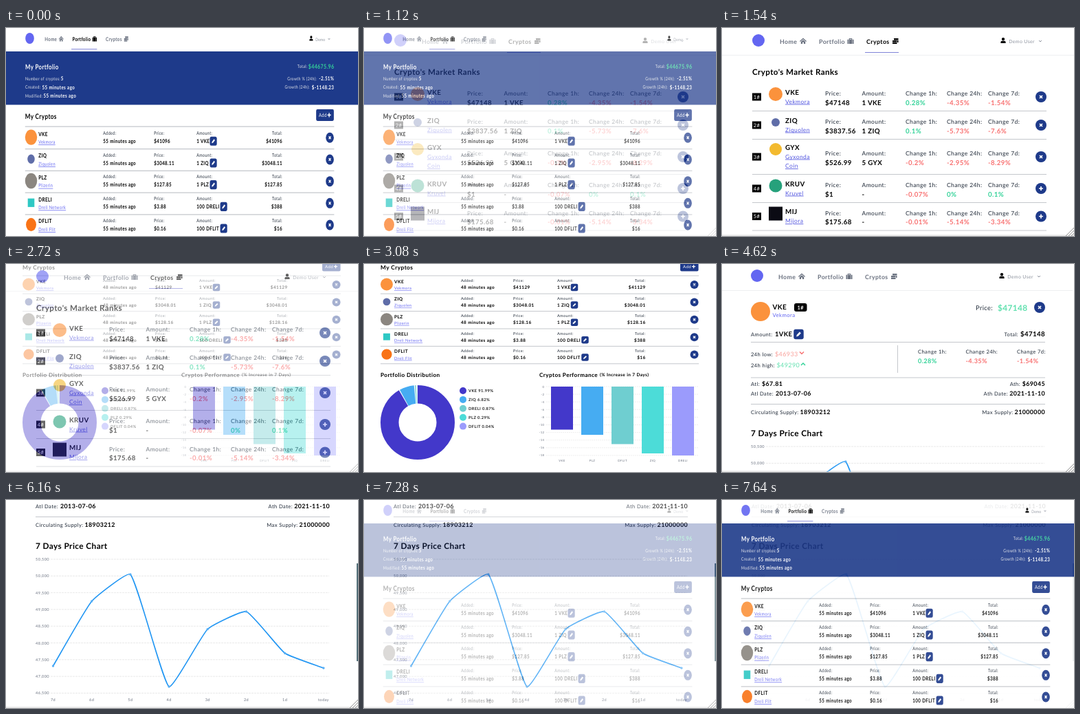
These frames come from a looping animation (512x302 px, 7700 ms). An HTML page:

```html
<!DOCTYPE html>
<html lang="en">
<head>
<meta charset="utf-8">
<title>Portfolio tour</title>
<style>
  html, body { margin: 0; width: 100%; height: 100%; overflow: hidden; background: #fff; }
  svg {
    position: fixed; inset: 0; width: 100%; height: 100%; background: #fff;
    font-family: Lato, "Open Sans", sans-serif; letter-spacing: .025em;
    text-rendering: geometricPrecision;
  }
  /* Each slide fades in over the previous one in ten hard steps; the last fades out to the first. */
  #ranks, #charts, #coin, #history { opacity: 0; animation: 7700ms steps(10, start) infinite; }
  #ranks { animation-name: ranks; }
  #charts { animation-name: charts; }
  #coin { animation-name: coin; }
  #history { animation-name: history; }
  @keyframes ranks {
    0%, 12.98% { opacity: 0 } 20.77%, 45% { opacity: 1 } 45.01%, 100% { opacity: 0 }
  }
  @keyframes charts {
    0%, 32.98% { opacity: 0 } 40.77%, 65% { opacity: 1 } 65.01%, 100% { opacity: 0 }
  }
  @keyframes coin {
    0%, 52.98% { opacity: 0 } 60.77%, 85% { opacity: 1 } 85.01%, 100% { opacity: 0 }
  }
  @keyframes history {
    0%, 72.98% { opacity: 0 } 80.77% { opacity: 1 }
    92.98% { opacity: 1; animation-timing-function: steps(9, start) } 100% { opacity: .1 }
  }
</style>
</head>
<body>
<script>
const NAVY = '#1e3a8a', INDIGO = '#6366f1', GREEN = '#34d399', RED = '#f87171';
const INK = '#1f2937', GRAY = '#6b7280', RULE = '#c4c7cc';
const PALETTE = ['#4338ca', '#46acf2', '#6fced0', '#4cdcd8', '#9b9bfc'];

const coins = {
  vke: { ticker: 'VKE', name: ['Vekmora'], color: '#fb923c', size: 1 },
  ziq: { ticker: 'ZIQ', name: ['Ziquolen'], color: '#5f6da8', size: .6 },
  plz: { ticker: 'PLZ', name: ['Plizerin'], color: '#8b8680', size: 1 },
  dreli: { ticker: 'DRELI', name: ['Dreli Network'], color: '#2ec8c4', size: .55, square: true },
  dflit: { ticker: 'DFLIT', name: ['Dreli Flit'], color: '#f97316', size: .85 },
  gyx: { ticker: 'GYX', name: ['Gyxonda', 'Coin'], color: '#f3ba2f', size: .9 },
  kruv: { ticker: 'KRUV', name: ['Kruvel'], color: '#26a17b', size: .95 },
  mij: { ticker: 'MIJ', name: ['Mijora'], color: '#0b0b14', size: 1, square: true },
};

// y is the middle of the capitals
const text = (x, y, str, size, color = INK, weight = 400, anchor = 'start', extra = '') =>
  `<text x="${x}" y="${y + size * .36}" font-size="${size}" fill="${color}" font-weight="${weight}" text-anchor="${anchor}" ${extra}>${str}</text>`;
const bold = (x, y, str, size, color = '#000', anchor) => text(x, y, str, size, color, 700, anchor);
const rect = (x, y, w, h, fill, r = 0) =>
  `<rect x="${x}" y="${y}" width="${w}" height="${h}" rx="${r}" fill="${fill}"/>`;
const circle = (x, y, r, fill) => `<circle cx="${x}" cy="${y}" r="${r}" fill="${fill}"/>`;
const line = (x1, y1, x2, y2, color = RULE, width = 1, dash = 'none') =>
  `<path d="M${x1} ${y1}L${x2} ${y2}" stroke="${color}" stroke-width="${width}" stroke-dasharray="${dash}"/>`;
const group = (transform, body) => `<g transform="${transform}">${body}</g>`;
const shape = (x, y, d, fill, scale = 1) =>
  group(`translate(${x} ${y}) scale(${scale})`, `<path d="${d}" fill="${fill}" fill-rule="evenodd"/>`);
const stroke = (x, y, d, color, scale = 1, width = 1.5) =>
  group(`translate(${x} ${y}) scale(${scale})`, `<path d="${d}" fill="none" stroke="${color}" stroke-width="${width}"/>`);

const HOME = 'M-5 0L0-4.5 5 0 4.2 1 0-2.8-4.2 1zM-3.2 1.1L0-1.8 3.2 1.1V4H.9V1.5H-.9V4H-3.2z';
const CASE = 'M-4.5-2.3H-2.8V4H-4.5zM2.8-2.3H4.5V4H2.8zM-2.3 4V-4H2.3V4zM-1.2-2.3H1.2V-3H-1.2z';
const STACK = 'M-2-4H4.5V-1.5H-2zM-4-1H2.5V1.2H-4zM-4 1.8H2.5V4H-4zM3-1H4.5V2H3z';
const USER = 'M-3.6 4V2.6Q-3.6.7-1.7.7H1.7Q3.6.7 3.6 2.6V4zM-2.2-1.9a2.2 2.2 0 1 1 4.4 0a2.2 2.2 0 1 1-4.4 0z';
const PEN = 'M-2.8 2.8L-2.2.6 1.2-2.8 2.8-1.2-.6 2.2z';
const CROSS = 'M-2-2L2 2M2-2L-2 2', PLUS = 'M-3 0H3M0-3V3', DOWN = 'M-3-1.5L0 1.5 3-1.5', UP = 'M-3 1.5L0-1.5 3 1.5';

const mark = ({ color, size, square }, x, y, r) => square
  ? rect(x - r * size, y - r * size, 2 * r * size, 2 * r * size, color)
  : circle(x, y, r * size, color);
const roundButton = (x, y, r, icon) => circle(x, y, r, NAVY) + stroke(x, y, icon, '#fff', r / 8, 1.7);
const penButton = (x, y, s) => rect(x - s / 2, y - s / 2, s, s, NAVY, s * .2) + shape(x, y, PEN, '#fff', s / 12);
const tone = value => value[0] === '-' ? RED : GREEN;

const frameEdge = () => line(0, 301, 512, 301, '#d5d5d5')
  + [0, 4, 8].map(d => line(500 + d, 302, 512, 290 + d, '#8a8a8a', .9)).join('');

const navLinks = active => circle(53, 18, 9, INDIGO)
  + [['Home', 84, 118, HOME], ['Portfolio', 141, 187, CASE], ['Cryptos', 210, 252, STACK]]
    .map(([label, x, iconX, icon]) => {
      const color = label === active ? '#000' : GRAY;
      return bold(x, 19.5, label, 8.8, color) + shape(iconX, 19, icon, color)
        + (label === active ? line(x - 2, 35.5, iconX + 5, 35.5, '#8083d8', 1.2) : '');
    }).join('');
const navUser = (name, iconX) => shape(iconX, 18, USER, '#000')
  + text(455, 19.5, name, 6.9, '#8b919c', 400, 'end') + stroke(463, 19, DOWN, GRAY, .6);
const nav = active => navLinks(active) + navUser('Demo User', 409) + line(0, 39.5, 512, 39.5, '#eeeff1');

function holdings(ago, prices, totals) {
  const amounts = [1, 1, 1, 100, 100];
  const rows = ['vke', 'ziq', 'plz', 'dreli', 'dflit'].map((key, i) => {
    const coin = coins[key], y = 30 + 25.4 * i;
    const cell = (x, label, value, anchor) =>
      text(x, y - 5.5, label, 5.5, INK, 400, anchor) + bold(x, y + 4, value, 6.4, '#000', anchor);
    return mark(coin, 33, y - .5, 9)
      + bold(44, y - 4.5, coin.ticker, 6.6)
      + text(44, y + 5, coin.name[0], 5.8, INDIGO, 400, 'start', 'text-decoration="underline"')
      + cell(141, 'Added:', ago + ' minutes ago') + cell(217, 'Price:', '$' + prices[i])
      + cell(281, 'Amount:', `${amounts[i]} ${coin.ticker}`) + cell(409.5, 'Total:', '$' + totals[i], 'end')
      + penButton(amounts[i] > 1 ? 321.5 : 306, y + 4, 10.5)
      + roundButton(480.5, y, 6, CROSS) + line(24, y + 13.2, 487, y + 13.2);
  });
  return bold(24, 5, 'My Cryptos', 8.4) + rect(460, -3, 26.5, 13.5, NAVY, 2)
    + text(464, 3.7, 'Add', 6, '#fff') + stroke(479.5, 3.7, PLUS, '#fff', .85)
    + line(24, 17, 487, 17) + rows.join('');
}

function portfolioSlide() {
  const label = (x, y, str, anchor) => text(x, y, str, 5.35, '#e5e7eb', 400, anchor);
  const value = (x, y, str, anchor) => bold(x, y, str, 6.4, '#fff', anchor);
  const summary = bold(24.3, -52.7, 'My Portfolio', 8.1, '#fff')
    + label(24.3, -39, 'Number of cryptos:') + value(77.5, -39, '5')
    + label(24.3, -28.7, 'Created:') + value(49.5, -28.7, '55 minutes ago')
    + label(24.3, -18.6, 'Modified:') + value(51.5, -18.6, '55 minutes ago')
    + label(447, -52.7, 'Total:', 'end') + bold(487, -53, '$44675.96', 7.2, GREEN, 'end')
    + label(461, -39, 'Growth % (24h):', 'end') + value(487, -39, '-2.51%', 'end')
    + label(450.6, -28.7, 'Growth (24h):', 'end') + value(487, -28.7, '$-1148.23', 'end');
  // This page is shown narrower than it is tall.
  return group('matrix(.704 0 0 .9 -2.8 -1.2)', navLinks('Portfolio'))
    + group('matrix(.704 0 0 .9 144 -1.2)', navUser('Demo', 426))
    + rect(0, 34, 512, 77.5, NAVY)
    + group('matrix(.971 0 0 1.248 4.46 121.8)', summary
      + holdings(55, ['41096', '3048.11', '127.85', '3.88', '0.16'], ['41096', '3048.11', '127.85', '388', '16']));
}

function ranksSlide() {
  const rows = [
    ['vke', 100, '47148', 1, '0.28%', '-4.35%', '-1.54%'],
    ['ziq', 141, '3837.56', 1, '0.1%', '-5.73%', '-7.6%'],
    ['gyx', 187, '526.99', 5, '-0.2%', '-2.95%', '-8.29%'],
    ['kruv', 233, '1', 0, '-0.07%', '0%', '0.1%'],
    ['mij', 273.5, '175.68', 0, '-0.01%', '-5.14%', '-3.34%'],
  ].map(([key, y, price, amount, hour, day, week], i) => {
    const coin = coins[key], extra = coin.name.length - 1, top = y - 7 - 7 * extra;
    const cell = (x, label, value, color) =>
      text(x, y - 5, label, 8.5) + bold(x, y + 8.5, value, 9.7, color);
    return rect(44, y - 5.5, 13, 11, '#000') + text(50.5, y, i + 1 + '#', 7.5, '#fff', 400, 'middle')
      + mark(coin, 78, y - 4 - 7 * extra, 10) + bold(92, top, coin.ticker, 9.8)
      + coin.name.map((word, n) => text(92, top + 13.5 * (n + 1), word, 8.5, '#5558e0', 400, 'start', 'text-decoration="underline"')).join('')
      + cell(150, 'Price:', '$' + price) + cell(203.5, 'Amount:', amount ? `${amount} ${coin.ticker}` : '-')
      + cell(267, 'Change 1h:', hour, tone(hour)) + cell(327, 'Change 24h:', day, tone(day))
      + cell(387, 'Change 7d:', week, tone(week))
      + roundButton(464, y, 8, amount ? CROSS : PLUS)
      + line(44, y + 20.5 + 5 * extra, 472, y + 20.5 + 5 * extra);
  });
  return nav('Cryptos') + bold(44, 64, "Crypto's Market Ranks", 11.6) + rows.join('') + frameEdge();
}

function chartsSlide() {
  const shares = [['vke', 91.99], ['ziq', 6.82], ['dreli', .87], ['plz', .29], ['dflit', .04]];
  let start = 0;
  const donut = shares.map(([key, share], i) => {
    const arc = `<circle cx="78" cy="230" r="40.75" fill="none" stroke="${PALETTE[i]}" stroke-width="26.5" pathLength="100" stroke-dasharray="${Math.max(share - .4, .1)} 100" stroke-dashoffset="${-start}" transform="rotate(-90 78 230)"/>`;
    start += share;
    const y = 184 + 12.9 * i;
    return arc + circle(144, y, 5, PALETTE[i]) + bold(152, y, `${coins[key].ticker} ${share.toFixed(2)}%`, 5.8, '#222');
  });
  const grid = Array.from({ length: 10 }, (_, i) => {
    const y = 178 + 11.1 * i;
    return line(265, y, 487, y, '#e8e8e8', .7, '2 1') + text(262.5, y, i ? -2 * i : 0, 4.3, GRAY, 400, 'end');
  });
  const bars = [['vke', 62.5], ['plz', 70], ['dflit', 83.5], ['ziq', 97], ['dreli', 100]].map(([key, h], i) =>
    rect(272 + 44 * i, 178, 32, h, PALETTE[i]) + text(288 + 44 * i, 285, coins[key].ticker, 4.3, GRAY, 400, 'middle'));
  return holdings(48, ['41129', '3048.01', '128.16', '3.88', '0.16'], ['41129', '3048.01', '128.16', '388', '16'])
    + bold(24, 161, 'Portfolio Distribution', 8.2) + donut.join('')
    + bold(255, 161, 'Cryptos Performance', 8.2) + bold(343, 161, '(% Increase in 7 Days)', 6.5)
    + grid.join('') + bars.join('');
}

function smoothPath(points, tension) {
  const handles = points.map((p, i) => {
    const a = points[i - 1] || p, b = points[i + 1] || p;
    const before = Math.hypot(p[0] - a[0], p[1] - a[1]), after = Math.hypot(b[0] - p[0], b[1] - p[1]);
    const at = part => [0, 1].map(k => p[k] + tension * part / (before + after) * (b[k] - a[k]));
    return { into: at(-before), out: at(after) };
  });
  return 'M' + points[0] + points.slice(1).map((p, i) => `C${handles[i].out} ${handles[i + 1].into} ${p}`).join('');
}

function priceChart() {
  const points = [420, 326, 287, 450, 366.5, 341, 401.5, 423].map((y, i) => [67.5 + 56.2 * i, y]);
  const grid = Array.from({ length: 9 }, (_, i) => {
    const y = 265 + 24.3 * i;
    return line(64, y, 469, y, '#e4e4e4', .8, '3 1') + text(62, y, (50500 - 500 * i).toLocaleString('en-US'), 5.6, GRAY, 400, 'end');
  });
  return grid.join('')
    + `<path d="${smoothPath(points, .13)}" fill="none" stroke="#2196f3" stroke-width="1.6"/>`
    + points.map(([x, y], i) => circle(x, y, 1.7, '#5ab0f5')
      + text(x, 468.5, i < 7 ? 7 - i + 'd' : 'today', 5.6, GRAY, 400, 'middle')).join('');
}

function coinDetail() {
  const { vke } = coins;
  const label = (x, y, str, anchor) => text(x, y, str, 7.6, INK, 400, anchor);
  const value = (x, y, str, anchor) => bold(x, y, str, 8.9, '#000', anchor);
  const change = (x, str, amount) => label(x, 127.5, str) + bold(x, 141, amount, 9.2, tone(amount));
  return mark(vke, 56, 69, 14) + bold(73.5, 62, vke.ticker, 10) + text(73.5, 74, vke.name[0], 7.8, INDIGO)
    + rect(105, 57, 18.5, 12, '#000', 3) + bold(114.2, 63, '1#', 7.5, '#fff', 'middle')
    + text(369, 63.5, 'Price:', 9.3) + bold(401, 63.5, '$47148', 11.8, '#5fe0ae') + roundButton(462, 63, 8, CROSS)
    + label(42, 102, 'Amount:') + bold(77, 102, '1' + vke.ticker, 9.4) + penButton(111.5, 102, 14.5)
    + label(431, 102, 'Total:', 'end') + bold(470, 102, '$47148', 9.7, '#000', 'end')
    + line(42, 113.5, 470, 113.5)
    + label(42, 131.5, '24h low:') + text(77, 131, '$46933', 9, '#f9a09a') + stroke(116, 129, DOWN, RED)
    + label(42, 147.5, '24h high:') + text(79.5, 147, '$49290', 9, '#5fe0ae') + stroke(118, 145.5, UP, GREEN)
    + line(255.5, 118, 255.5, 158)
    + change(285, 'Change 1h:', '0.28%') + change(354.5, 'Change 24h:', '-4.35%') + change(429, 'Change 7d:', '-1.54%')
    + line(42, 165, 470, 165)
    + label(42, 174, 'Atl:') + value(58, 174, '$67.81')
    + label(42, 188, 'Atl Date:') + value(78, 188, '2013-07-06')
    + label(434, 174, 'Ath:', 'end') + value(470, 174, '$69045', 'end')
    + label(416, 188, 'Ath Date:', 'end') + value(470, 188, '2021-11-10', 'end')
    + line(42, 203.5, 470, 203.5)
    + label(42, 215.3, 'Circulating Supply:') + value(113.5, 215, '18903212')
    + label(423.5, 215.3, 'Max Supply:', 'end') + value(470, 215, '21000000', 'end')
    + bold(42, 246, '7 Days Price Chart', 11.85) + priceChart();
}

const slides = {
  portfolio: portfolioSlide(),
  ranks: ranksSlide(),
  charts: chartsSlide(),
  coin: group('translate(-2 -1)', nav()) + coinDetail() + frameEdge(),
  history: group('translate(1 -179)', coinDetail()) + rect(510, 92, 2, 142, '#55707a') + frameEdge(),
};
document.body.innerHTML = Object.entries(slides).map(([id, body]) =>
  `<svg id="${id}" viewBox="0 0 512 302" preserveAspectRatio="none">${body}</svg>`).join('');
</script>
</body>
</html>
```
